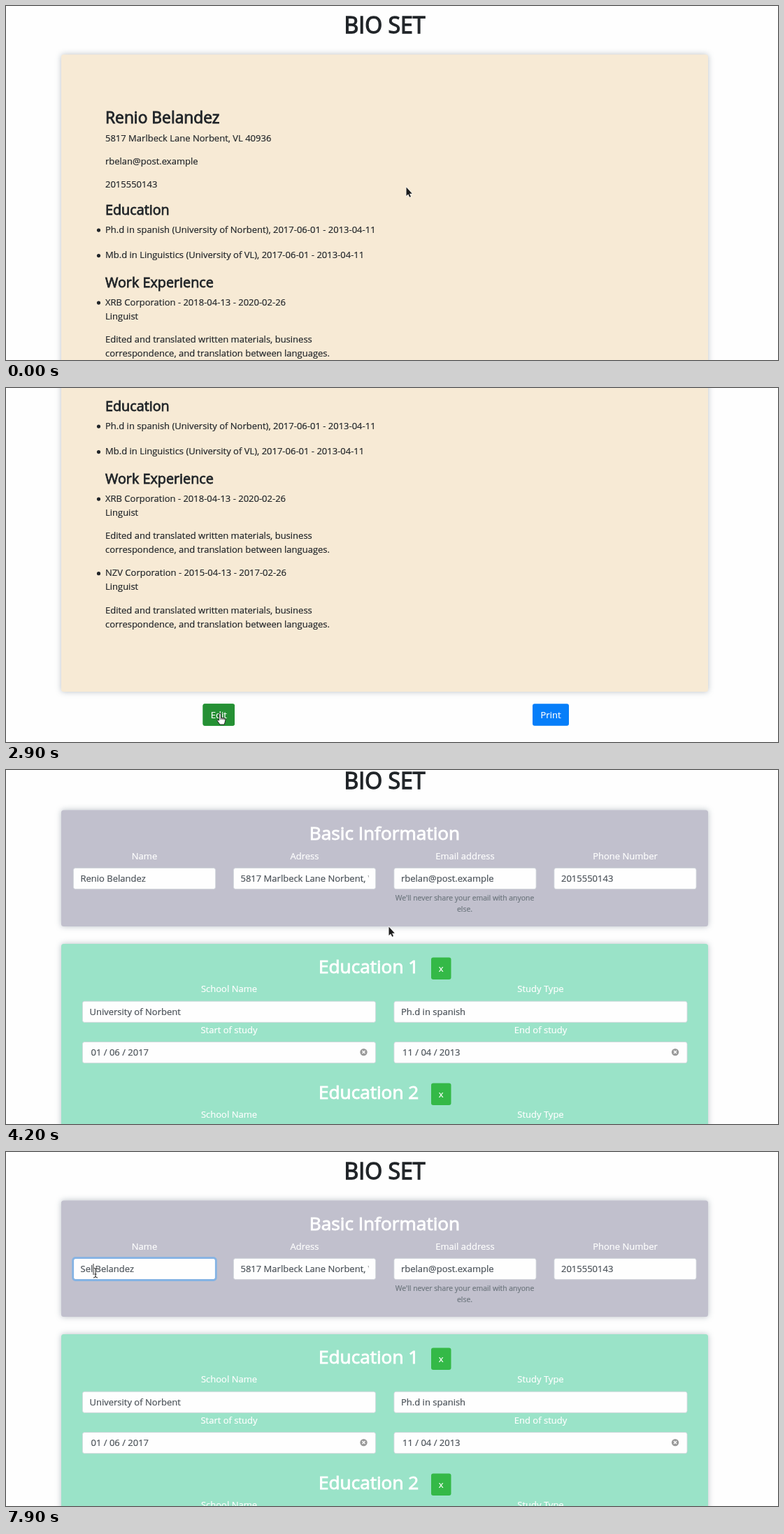
An HTML page for the animation above (8000 ms loop, 1104 px wide and 507 px high).

```html
<!DOCTYPE html>
<html lang="en">
<head>
<meta charset="utf-8">
<title>Resume editor</title>
<style>
html, body { margin: 0; width: 100%; height: 100%; overflow: hidden; background: #fefefe; }
svg { display: block; }
/* A hairline stroke gives the slightly heavier weight of the interface face. */
text {
  font: 13px "Open Sans", "Noto Sans", sans-serif; white-space: pre;
  color: #212529; fill: currentColor; stroke: currentColor; stroke-width: .2;
}
.title { font-size: 32px; stroke-width: 1.3; }
.name { font-size: 22.8px; stroke-width: .9; }
.section { font-size: 19.8px; stroke-width: .8; }
.head { font-size: 26.2px; stroke-width: .9; }
.label, .head { color: #fff; }
.value { color: #495057; }
.help { font-size: 10.4px; color: #6c757d; }
.mid { text-anchor: middle; }
.card { filter: drop-shadow(0 0 4px rgba(70, 90, 105, .38)); }
.input { fill: #fefefe; stroke: #ced4da; stroke-width: .8; }

/* Every part shares one 8 s clock; 1.25% is one 100 ms tick. */
.anim { animation: 8s step-end infinite; }
.late { opacity: 0; }
#page { animation-name: scroll; }
#cursor { animation-name: move; }
#cv { animation-name: cv; }
#form { animation-name: form; }
#hover { animation-name: hover; }
#arrow { animation-name: arrow; }
#hand { animation-name: hand; }
#beam { animation-name: beam; }
#ring { animation-name: ring; }
#caret { animation-name: caret; }
#plain { animation-name: plain; }
#selected { animation-name: selected; }
#typed1 { animation-name: typed1; }
#typed2 { animation-name: typed2; }
#typed3 { animation-name: typed3; }

@keyframes scroll {
  0% { transform: translateY(0); }
  7.5% { transform: translateY(0); animation-timing-function: steps(5); }
  13.75% { transform: translateY(-122px); animation-timing-function: steps(5); }
  20% { transform: translateY(-266px); }
  46.25% { transform: translateY(-266px); animation-timing-function: steps(5); }
  52.5% { transform: translateY(-12px); }
  55%, 100% { transform: translateY(0); }
}
@keyframes move {
  0% { transform: translate(572px, 259px); }
  21.25% { transform: translate(572px, 259px); animation-timing-function: steps(8); }
  31.25% { transform: translate(306px, 466px); }
  38.75% { transform: translate(306px, 466px); animation-timing-function: steps(2); }
  41.25% { transform: translate(382px, 371px); }
  45% { transform: translate(555px, 217px); }
  47.5% { transform: translate(547px, 224px); }
  58.75% { transform: translate(533px, 223px); }
  60% { transform: translate(533px, 223px); animation-timing-function: steps(6); }
  67.5% { transform: translate(196px, 184px); animation-timing-function: steps(3); }
  71.25% { transform: translate(129px, 172px); }
  72.5%, 100% { transform: translate(128px, 173px); }
}
@keyframes cv { 37.5% { opacity: 0; } }
@keyframes form { 37.5% { opacity: 1; } }
@keyframes hover { 33.75% { opacity: 1; } 37.5% { opacity: 0; } }
@keyframes arrow { 31.25% { opacity: 0; } 40% { opacity: 1; } 45% { opacity: 0; } 47.5% { opacity: 1; } 67.5% { opacity: 0; } }
@keyframes hand { 31.25% { opacity: 1; } 40% { opacity: 0; } }
@keyframes beam { 45% { opacity: 1; } 47.5% { opacity: 0; } 67.5% { opacity: 1; } }
@keyframes ring { 76.25% { opacity: 1; } }
@keyframes caret { 76.25% { opacity: 1; } 77.5% { opacity: 0; } }
@keyframes plain { 77.5% { opacity: 0; } }
@keyframes selected { 77.5% { opacity: 1; } 95% { opacity: 0; } }
@keyframes typed1 { 95% { opacity: 1; } 97.5% { opacity: 0; } }
@keyframes typed2 { 97.5% { opacity: 1; } 98.75% { opacity: 0; } }
@keyframes typed3 { 98.75% { opacity: 1; } }
</style>
</head>
<body>
<svg width="1104" height="507" viewBox="0 0 1104 507">
  <g id="page" class="anim">
    <text class="title mid" x="541.5" y="39">BIO SET</text>
    <g id="cv" class="anim"></g>
    <g id="form" class="anim late"></g>
  </g>
  <g id="cursor" class="anim">
    <path id="arrow" class="anim" d="M.5 .5V13l2.7-2.5 2 4.2 1.8-.8-2-4.1h3.8z"
      fill="#1c1c1c" stroke="#fff" stroke-width="1.2" paint-order="stroke"/>
    <g id="hand" class="anim late" fill="#fff" stroke="#222" stroke-width="1" stroke-linejoin="round">
      <path d="M-1.3 10V.6Q0-.9 1.3.6V6l5.3 1.2q1.6.5 1.3 2.3l-1 4-.8 2.5H-.1L-3.9 10.6q-.2-2 2.6-.6z"/>
      <path d="M1.4 6v3M3.8 6.6v2.6M6 7.1v2.3" fill="none"/>
    </g>
    <g id="beam" class="anim late" fill="none">
      <path d="M-3-7Q0-7 0-5V5Q0 7-3 7M3-7Q0-7 0-5M0 5Q0 7 3 7M-1.5 2h3" stroke="#fff" stroke-width="2.6" opacity=".7"/>
      <path d="M-3-7Q0-7 0-5V5Q0 7-3 7M3-7Q0-7 0-5M0 5Q0 7 3 7M-1.5 2h3" stroke="#222"/>
    </g>
  </g>
</svg>
<script>
const BLUE = '#067ef9', GREEN = '#34b947';
const PERSON = 'Renio Belandez', SURNAME = ' Belandez';
const ADDRESS = '5817 Marlbeck Lane Norbent, VL 40936';
const EMAIL = 'rbelan@post.example', PHONE = '2015550143';

const text = (x, y, content, cls = '') => `<text x="${x}" y="${y}" class="${cls}">${content}</text>`;
const rect = (x, y, w, h, fill, r = 3.5) =>
  `<rect x="${x}" y="${y}" width="${w}" height="${h}" rx="${r}" fill="${fill}"/>`;
const card = (y, h, fill) => `<g class="card">${rect(79, y, 925, h, fill)}</g>`;
const button = (x, y, w, label, fill) =>
  rect(x, y, w, 31.5, fill, 3) + text(x + w / 2, y + 20.5, label, 'label mid');
const bullet = (y, content) => `<circle cx="132.5" cy="${y - 3.6}" r="2.6" fill="#212529"/>` + text(142, y, content);

const job = (y, heading) => bullet(y, heading)
  + text(142, y + 20, 'Linguist')
  + text(142, y + 53.3, 'Edited and translated written materials, business')
  + text(142, y + 73.3, 'correspondence, and translation between languages.');

const box = (x, y, w) => `<rect class="input" x="${x + .4}" y="${y + .4}" width="${w - .8}" height="30.2" rx="3"/>`;
const label = (x, y, w, content) => text(x + w / 2, y - 12.5, content, 'label mid');
const field = (x, y, w, name, value) => label(x, y, w, name) + box(x, y, w)
  + `<svg x="${x}" y="${y}" width="${w - 10.5}" height="31">${text(10.5, 20.2, value, 'value')}</svg>`;
const dateField = (x, y, w, name, value) => label(x, y, w, name) + box(x, y, w)
  + text(x + 12.5, y + 19.7, value, 'value')
  + `<circle cx="${x + w - 17.5}" cy="${y + 15}" r="5.2" fill="#999"/>`
  + `<path d="M${x + w - 19.5} ${y + 13}l4 4m0-4l-4 4" stroke="#fff" stroke-width="1.4"/>`;

const education = (y, number, school, study) =>
  text(447, y + 9, `Education ${number}`, 'head') + button(608, y - 13, 28.5, 'x', GREEN)
  + field(109, y + 49.3, 420, 'School Name', school)
  + field(554.5, y + 49.3, 420, 'Study Type', study)
  + dateField(109, y + 107.6, 420, 'Start of study', '01 / 06 / 2017')
  + dateField(554.5, y + 107.6, 420, 'End of study', '11 / 04 / 2013');

const caret = x => `<path d="M${x} 160v16" stroke="#333" stroke-width="1"/>`;
const typing = (id, letters, width) =>
  `<g id="${id}" class="anim late">${text(106.5, 172.2, letters + SURNAME, 'value')}${caret(107 + width)}</g>`;

const nameField = label(96, 152, 204, 'Name') + box(96, 152, 204)
  + `<rect id="ring" class="anim late" x="95.7" y="151.7" width="204.6" height="31.8" rx="3.5" fill="none" stroke="#84b3e4" stroke-width="2.8"/>`
  + `<g id="plain" class="anim">${text(106.5, 172.2, PERSON, 'value')}</g>`
  + `<g id="caret" class="anim late">${caret(128)}</g>`
  + `<g id="selected" class="anim late">${rect(106.5, 160, 34.5, 16, '#dd5421', 0)}`
  + text(106.5, 172.2, `<tspan class="label">${PERSON.slice(0, 5)}</tspan>${SURNAME}`, 'value') + '</g>'
  + typing('typed1', 'S', 7) + typing('typed2', 'Se', 14.5) + typing('typed3', 'Sel', 18);

document.getElementById('cv').innerHTML = card(69.5, 631.5, '#f7ead5')
  + text(142, 167.5, PERSON, 'name')
  + text(142, 193.7, ADDRESS) + text(142, 227, EMAIL) + text(142, 260.4, PHONE)
  + text(142, 299, 'Education', 'section')
  + bullet(324.7, 'Ph.d in spanish (University of Norbent), 2017-06-01 - 2013-04-11')
  + bullet(361.2, 'Mb.d in Linguistics (University of VL), 2017-06-01 - 2013-04-11')
  + text(142, 403, 'Work Experience', 'section')
  + job(428.7, 'XRB Corporation - 2018-04-13 - 2020-02-26')
  + job(535.3, 'NZV Corporation - 2015-04-13 - 2017-02-26')
  + button(281.5, 718.2, 45.5, 'Edit', GREEN)
  + `<g id="hover" class="anim late">${button(281.5, 718.2, 45.5, 'Edit', '#259034')}</g>`
  + button(753, 718.2, 52, 'Print', BLUE);

document.getElementById('form').innerHTML = card(69.5, 166.5, '#c1c0cd')
  + text(541.5, 112, 'Basic Information', 'head mid')
  + nameField
  + field(325, 152, 204, 'Adress', ADDRESS)
  + field(554.5, 152, 204, 'Email address', EMAIL)
  + field(783.5, 152, 204, 'Phone Number', PHONE)
  + text(656, 199, "We'll never share your email with anyone", 'help mid')
  + text(656, 215, 'else.', 'help mid')
  + card(261, 393, '#9ae3c8')
  + education(293.5, 1, 'University of Norbent', 'Ph.d in spanish')
  + education(473.5, 2, 'University of VL', 'Mb.d in Linguistics')
  + button(91, 662.4, 110, 'Add Education', BLUE)
  + card(711, 400, '#84aecf')
  + text(404, 752, 'Work experience 1', 'head') + button(650.5, 730, 28.5, 'x', GREEN);
</script>
</body>
</html>
```
